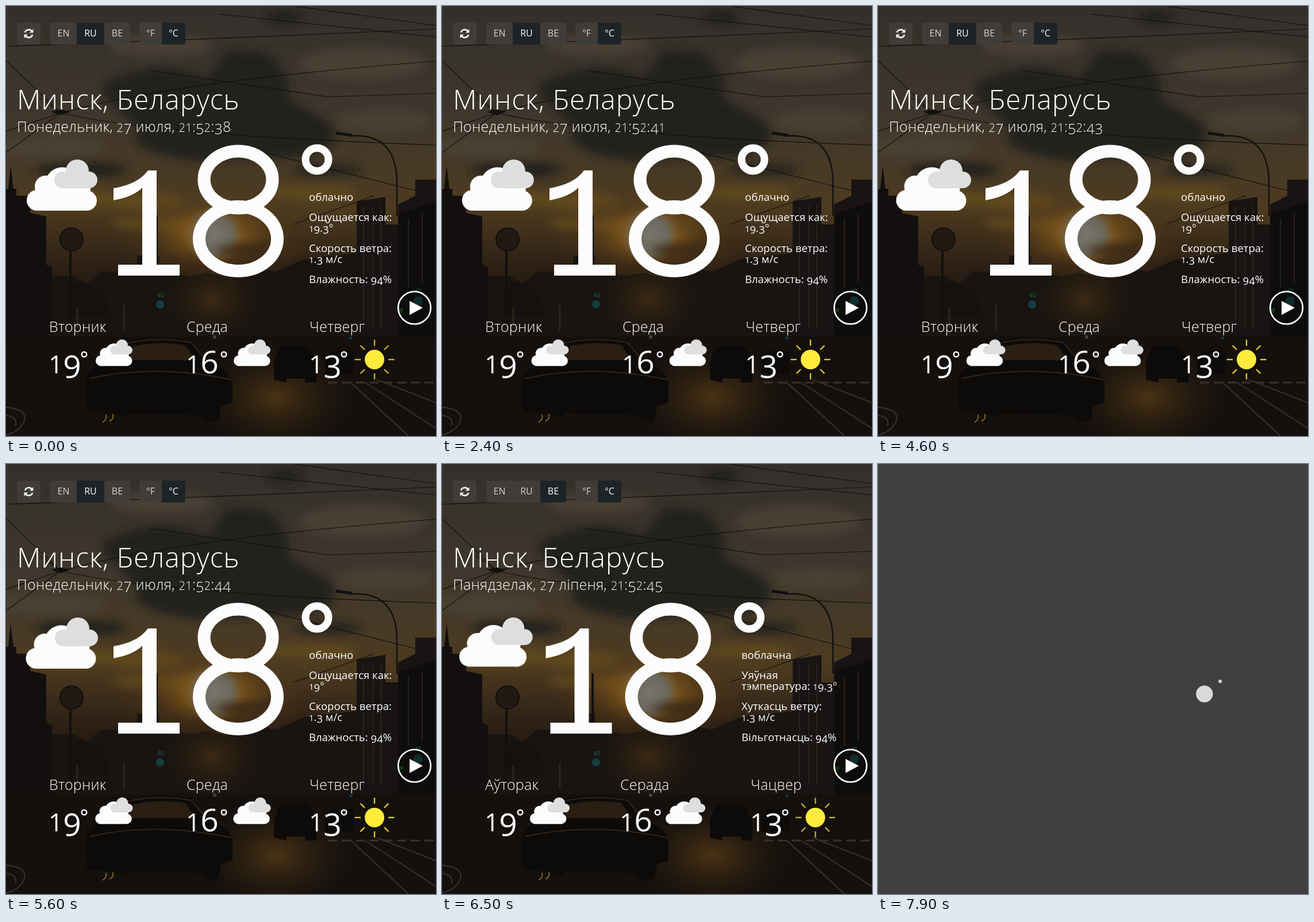
Recreate the animation shown at these times as an HTML page. Size 748 px wide and 748 px high, loop 8 s.

```html
<!DOCTYPE html>
<html lang="ru">
<head>
<meta charset="utf-8">
<title>Погода</title>
<style>
  html, body { margin: 0; width: 100%; height: 100%; overflow: hidden; background: #15110f; }
  svg { position: absolute; left: 0; top: 0; width: 748px; height: 748px; }
  text { font-family: "Open Sans", "Noto Sans", sans-serif; fill: #fff; white-space: pre; }
  .num { fill: none; stroke: #fcfcfc; stroke-width: 22; }
  .solid { fill: #fcfcfc; }
</style>
</head>
<body>
<svg id="photo" viewBox="0 0 748 748" aria-hidden="true">
  <defs>
    <linearGradient id="sky" x1="0" y1="0" x2="0" y2="1">
      <stop offset="0" stop-color="#332f2a"/>
      <stop offset=".25" stop-color="#3f372d"/>
      <stop offset=".47" stop-color="#4d3b20"/>
      <stop offset=".6" stop-color="#2e2115"/>
      <stop offset=".72" stop-color="#1a130e"/>
      <stop offset="1" stop-color="#19130f"/>
    </linearGradient>
    <radialGradient id="glow">
      <stop offset="0" stop-color="#b57b20"/>
      <stop offset=".25" stop-color="#8c5d19" stop-opacity=".8"/>
      <stop offset=".6" stop-color="#5b3e18" stop-opacity=".4"/>
      <stop offset="1" stop-color="#4a351a" stop-opacity="0"/>
    </radialGradient>
    <radialGradient id="core">
      <stop offset="0" stop-color="#77766c"/>
      <stop offset=".6" stop-color="#6a675c"/>
      <stop offset="1" stop-color="#6a5a38" stop-opacity="0"/>
    </radialGradient>
    <radialGradient id="road">
      <stop offset="0" stop-color="#4a3314"/>
      <stop offset="1" stop-color="#2a1d10" stop-opacity="0"/>
    </radialGradient>
    <filter id="soft" x="-40%" y="-40%" width="180%" height="180%"><feGaussianBlur stdDeviation="8"/></filter>
  </defs>
  <rect width="748" height="748" fill="url(#sky)"/>
  <g filter="url(#soft)">
    <g fill="#484136">
      <ellipse cx="620" cy="100" rx="110" ry="28"/>
      <ellipse cx="270" cy="68" rx="90" ry="18"/>
      <ellipse cx="80" cy="245" rx="90" ry="20"/>
      <ellipse cx="660" cy="200" rx="80" ry="18"/>
    </g>
    <g fill="#24201b">
      <path d="M372 95Q380 70 420 78 465 75 478 110 500 130 490 160L560 200Q600 240 520 262L330 270Q200 250 230 215L180 165Q150 140 190 125L240 110Q300 100 350 125Z"/>
      <ellipse cx="130" cy="285" rx="80" ry="14"/>
      <ellipse cx="485" cy="20" rx="32" ry="13"/>
      <ellipse cx="560" cy="285" rx="60" ry="10"/>
    </g>
    <g fill="#60481f">
      <ellipse cx="120" cy="335" rx="75" ry="14"/>
      <ellipse cx="240" cy="340" rx="70" ry="14"/>
      <ellipse cx="530" cy="325" rx="80" ry="11"/>
      <ellipse cx="265" cy="378" rx="80" ry="12"/>
    </g>
  </g>
  <ellipse cx="360" cy="398" rx="170" ry="90" fill="url(#glow)"/>
  <circle cx="362" cy="398" r="52" fill="url(#core)"/>
  <ellipse cx="440" cy="425" rx="75" ry="11" fill="#3c2918" filter="url(#soft)"/>
  <path fill="#191411" d="M0 470H120L140 484 165 462H228V434H266V462L320 470 350 464 380 472 430 455 470 462 520 440 610 430V600H0Z"/>
  <path fill="#120f0e" d="M0 318H4L8 277 13 318H18V330H42V360L70 366V450L80 455V600H0Z"/>
  <path fill="#171413" d="M610 340L660 332V380H682V345L712 330V302H748V650H610Z"/>
  <path fill="#0f0d0c" d="M682 362L748 340V660L682 625Z"/>
  <g stroke="#27221d" stroke-width="2">
    <path d="M622 350V560M638 347V560M652 345V560M700 370V490M724 362V480"/>
  </g>
  <path fill="#15110e" d="M106 500Q125 470 150 488 175 492 180 540H106Z"/>
  <path fill="#14100e" d="M0 575H748V748H0Z"/>
  <ellipse cx="360" cy="510" rx="90" ry="75" fill="url(#road)" opacity=".7"/>
  <ellipse cx="470" cy="680" rx="140" ry="95" fill="url(#road)"/>
  <ellipse cx="270" cy="640" rx="120" ry="38" fill="url(#road)" opacity=".7"/>
  <g fill="#0d0b0a">
    <path d="M138 650Q150 622 182 616L205 584Q262 572 322 582L352 620Q388 630 394 655V690L374 696 370 720Q350 730 338 712L215 708Q206 722 190 710L140 704Z"/>
    <path d="M466 650V618L476 594Q502 586 528 594L540 618V655H520V648H488V655Z"/>
    <path d="M555 640V615L566 600H604V640Z"/>
  </g>
  <path fill="#2b1e12" d="M222 592Q268 582 312 590L330 616H212Z"/>
  <path fill="none" stroke="#3a2c1e" stroke-width="1.5" d="M205 588Q262 574 322 585L350 618M145 648Q260 622 392 650"/>
  <g fill="none" stroke="#3a322a" stroke-width="2">
    <path d="M0 698Q42 702 30 726 20 742 0 746M0 712Q22 716 16 730"/>
    <path d="M600 655L700 748M625 655L748 735M645 650L748 690"/>
    <path d="M560 655H748" stroke-width="3" stroke-dasharray="16 8"/>
  </g>
  <path d="M168 724q8-4 6-13M180 722q8-3 6-12" fill="none" stroke="#80602a" stroke-width="2"/>
  <g fill="none" stroke="#12100e" stroke-width="1.2">
    <path d="M0 70Q300 60 748 40M370 14L748 54M500 0L748 34M0 95L95 186 0 218M95 186L60 160M95 186Q300 130 748 96M250 112L560 158 748 152M95 186Q260 225 748 242M430 250L748 330M0 255L95 186M500 380L640 330"/>
    <path d="M112 425V560M262 364V470" stroke-width="4"/>
  </g>
  <path fill="#12100e" d="M78 184L95 180 112 184 95 190Z"/>
  <circle cx="114" cy="406" r="20" fill="#211a14" stroke="#100d0b" stroke-width="2"/>
  <path d="M576 222L602 226Q676 222 680 300V365" fill="none" stroke="#11100f" stroke-width="2.5"/>
  <path d="M574 221L602 225" stroke="#11100f" stroke-width="5"/>
  <path d="M124 525V560M205 520V565" stroke="#30251a" stroke-width="3"/>
  <g fill="#123f3f">
    <circle cx="268" cy="519" r="7"/><circle cx="717" cy="513" r="8"/>
    <circle cx="363" cy="576" r="3" fill="#44413b"/><circle cx="600" cy="577" r="2.5"/>
    <path d="M682 526h9v6h-9z" fill="#174d18"/>
  </g>
  <text x="263" y="507" font-size="10" style="fill:#1c6357">40</text>
  <text x="711" y="500" font-size="10" style="fill:#1c6357">40</text>
</svg>

<svg id="page" viewBox="0 0 748 748">
  <g id="buttons"></g>
  <g id="view"></g>
  <text id="clock" x="19" y="219" font-size="25" font-weight="300" letter-spacing=".24"></text>
  <circle cx="710.5" cy="525" r="28.3" fill="#0d0c0b" fill-opacity=".35" stroke="#fff" stroke-width="2.6"/>
  <path d="M702 513L725 525 702 537.500Z" fill="#fff"/>
</svg>

<svg id="loader" viewBox="0 0 748 748">
  <rect width="748" height="748" fill="#404040"/>
  <g id="spin" fill="#d9d9d9">
    <circle id="dotA" cx="17.5" cy="-17.5"/>
    <circle id="dotB" cx="17.5" cy="17.5"/>
  </g>
</svg>

<script>
const LOOP = 8000;
const $ = id => document.getElementById(id);

// Old-style figures: 0-2 are small, 3 4 5 7 9 hang below the line.
function figures(str, size) {
  let out = '', drop = 0;
  for (const ch of str) {
    const want = '34579'.includes(ch) ? size * .14 : 0;
    const dy = want - drop;
    drop = want;
    const fs = '012'.includes(ch) ? size * .8 : size;
    out += `<tspan dy="${dy.toFixed(2)}" font-size="${fs}">${ch}</tspan>`;
  }
  return out;
}
const label = (x, y, size, str, weight = 400, gap = 0) =>
  `<text x="${x}" y="${y}" font-size="${size}" font-weight="${weight}" letter-spacing="${gap}">${figures(str, size)}</text>`;
const ring = (x, y, r, w) =>
  `<circle cx="${x}" cy="${y}" r="${r}" fill="none" stroke="#fcfcfc" stroke-width="${w}"/>`;
const disc = (x, y, r) => `<circle cx="${x}" cy="${y}" r="${r}"/>`;

const cloud = (x, y, s) => `<g transform="translate(${x} ${y}) scale(${s})">
  <g class="front" fill="#fcfcfc">${disc(18, 71, 18)}${disc(104.5, 71.5, 17.5)}${disc(33, 47, 19)}${disc(62, 43.5, 30)}${disc(88, 52, 23)}
    <rect x="17" y="48" width="88" height="41"/></g>
  <g class="back" fill="#dedede">${disc(98, 20, 20)}${disc(72.5, 35.5, 14.5)}${disc(118.5, 35.5, 14.5)}
    <rect x="72" y="30" width="47" height="20"/></g></g>`;

function sun(x, y) {
  let rays = '';
  for (let a = 0; a < 360; a += 45) rays += `<path d="M24 0H34.500" transform="rotate(${a})"/>`;
  return `<g transform="translate(${x} ${y})"><circle r="17" fill="#ffeb3b"/>
    <g class="rays" stroke="#ffeb3b" stroke-width="2.3">${rays}</g></g>`;
}

const eighteen = dx => `<g transform="translate(${dx} 0)" role="img" aria-label="18">
  <path class="solid" d="M262 286H247C235 303 212 313 187 317V338C210 334 228 326 237 316V450H195V469H302V450H262Z"/>
  <ellipse class="num" cx="404" cy="302" rx="59.5" ry="49.500"/>
  <ellipse class="num" cx="404" cy="405" rx="68" ry="56"/></g>`;
const sixtyFive = `<g class="num" role="img" aria-label="65">
  <ellipse cx="253" cy="394" rx="70.5" ry="67.500"/>
  <path d="M317 290C303 265 281 252 254 252C208 252 182 300 182 388"/>
  <path d="M498 297H391L372 407C384 388 408 379 432 379C470 379 499 405 499 441C499 480 470 506 430 506C400 506 378 494 366 472"/></g>`;

const ru = {
  city: 'Минск, Беларусь', date: 'Понедельник, 27 июля, ',
  days: ['Вторник', 'Среда', 'Четверг'], dayX: [75, 314, 528],
  iconX: [152.9, 393], sunX: 641
};
const celsius = {
  ...ru, big: eighteen(0), degX: 541, icon: [30, 1], sideX: 527, sideY: [339, 374, 393, 428, 447, 482],
  side: ['облачно', 'Ощущается как:', '19.3°', 'Скорость ветра:', '1.3 м/с', 'Влажность: 94%'],
  temps: ['19', '16', '13'], degs: [136, 379, 588]
};
const celsiusRound = { ...celsius, side: celsius.side.map(s => s === '19.3°' ? '19°' : s) };
const fahrenheit = {
  ...ru, big: sixtyFive, degX: 562.5, icon: [29.5, .863], sideX: 549, sideY: [330, 365, 384, 419, 438, 473, 492],
  side: ['облачно', 'Ощущается', 'как: 67°', 'Скорость', 'ветра: 1.3 м/с', 'Влажность:', '94%'],
  temps: ['67', '61', '56'], degs: [145.5, 378, 599]
};
const belarusian = {
  ...celsius, city: 'Мінск, Беларусь', date: 'Панядзелак, 27 ліпеня, ',
  big: eighteen(-6.5), degX: 534.5, icon: [30, .96], sideX: 521,
  side: ['воблачна', 'Уяўная', 'тэмпература: 19.3°', 'Хуткасць ветру:', '1.3 м/с', 'Вільготнасць: 94%'],
  days: ['Аўторак', 'Серада', 'Чацвер'], dayX: [75, 310, 537],
  iconX: [152.9, 389], degs: [136, 375, 597], sunX: 649.5
};

// Each step: when it shows and when its icons began to move.
const views = [
  { at: 0, born: -2000, data: celsius },
  { at: 3200, born: 3200, data: fahrenheit },
  { at: 4100, born: 4100, data: celsiusRound },
  { at: 6500, born: 6500, data: belarusian }
];
const langSteps = [{ at: 0, v: 'RU' }, { at: 5700, v: 'BE' }, { at: 7500, v: 'EN' }];
const unitSteps = [{ at: 0, v: '°C' }, { at: 3200, v: '°F' }, { at: 4100, v: '°C' }];
const loads = [{ from: 5800, to: 6500 }, { from: 7617, to: LOOP }];
const current = (steps, t) => steps.filter(s => s.at <= t).pop();

function drawView(d) {
  const [ix, is] = d.icon;
  $('view').innerHTML =
    label(19, 180, 48, d.city, 300, .9) +
    cloud(ix, 267, is) + d.big + ring(d.degX, 267, 20, 13) +
    d.side.map((s, i) => label(d.sideX, d.sideY[i], 18.5, s)).join('') +
    d.days.map((s, i) => label(d.dayX[i], 567, 25, s, 300, .2)).join('') +
    d.temps.map((s, i) => label(d.dayX[i] - 1, 639, 55, s) + ring(d.degs[i], 606, 4.3, 2.5)).join('') +
    d.iconX.map(x => cloud(x, 580, .52)).join('') + sun(d.sunX, 615);
}

const keys = [['EN', 77, 46], ['RU', 123, 48], ['BE', 171, 45], ['°F', 232, 39], ['°C', 271, 41]];
function drawButtons(lang, unit) {
  const box = (x, w, fill, r = 0) => `<rect x="${x}" y="29" width="${w}" height="38" rx="${r}" fill="${fill}"/>`;
  const on = s => s === lang || s === unit;
  $('buttons').innerHTML =
    `<clipPath id="groups">${box(77, 139, '#000', 4)}${box(232, 80, '#000', 4)}</clipPath>` +
    box(19, 41, '#403c38', 4) +
    `<g fill="none" stroke="#f4f4f4" stroke-width="2.6"><path d="M33 46A6.800 6.800 0 0 1 45 44"/><path d="M46 50A6.800 6.800 0 0 1 34 52"/></g>
     <path fill="#f4f4f4" d="M47.500 40V46.500H41ZM31.500 56V49.500H38Z"/>` +
    '<g clip-path="url(#groups)">' + keys.map(([s, x, w]) => box(x, w, on(s) ? '#1d2427' : '#403c38')).join('') + '</g>' +
    keys.map(([s, x, w]) => `<text x="${x + w / 2}" y="53" font-size="16" text-anchor="middle"
      style="fill:${on(s) ? '#fff' : '#d2d2d2'}">${s}</text>`).join('');
}

// Ease-in-out cubic curve (.42, 0, .58, 1), solved by bisection.
function ease(p) {
  let lo = 0, hi = 1;
  for (let i = 0; i < 20; i++) {
    const u = (lo + hi) / 2, v = 1 - u;
    if (1.26 * v * v * u + 1.74 * v * u * u + u * u * u < p) lo = u; else hi = u;
  }
  return lo * lo * (3 - 2 * lo);
}
const triangle = (t, period) => 1 - Math.abs(1 - 2 * (t % period) / period);
const set = (sel, name, value) => document.querySelectorAll(sel).forEach(e => e.setAttribute(name, value));

let shownView, shownKeys, shownClock;
function draw(t) {
  const view = current(views, t);
  const lang = current(langSteps, t).v, unit = current(unitSteps, t).v;
  if (view !== shownView) drawView((shownView = view).data);
  if (lang + unit !== shownKeys) { shownKeys = lang + unit; drawButtons(lang, unit); }

  const clock = view.data.date + '21:52:' + (38 + Math.floor((t + 700) / 1000));
  if (clock !== shownClock) $('clock').innerHTML = figures(shownClock = clock, 25);

  const sway = triangle(t - view.born, 6000);
  set('.front', 'transform', `translate(${9 * sway} 0)`);
  set('.back', 'transform', `translate(${-6 * sway} 0)`);
  set('.rays', 'opacity', .75 + .25 * triangle(t - view.born, 2000));

  const load = loads.find(l => t >= l.from && t < l.to);
  $('loader').style.display = load ? 'block' : 'none';
  if (load) {
    const age = t - load.from;
    const grow = ease(triangle(age, 2000));
    $('spin').setAttribute('transform', `translate(570.5 375.4) rotate(${age * .18})`);
    $('dotA').setAttribute('r', 17.6 * grow);
    $('dotB').setAttribute('r', 17.6 * (1 - grow));
  }
}

const start = performance.now();
function tick() {
  draw((performance.now() - start) % LOOP);
  requestAnimationFrame(tick);
}
tick();
</script>
</body>
</html>
```
